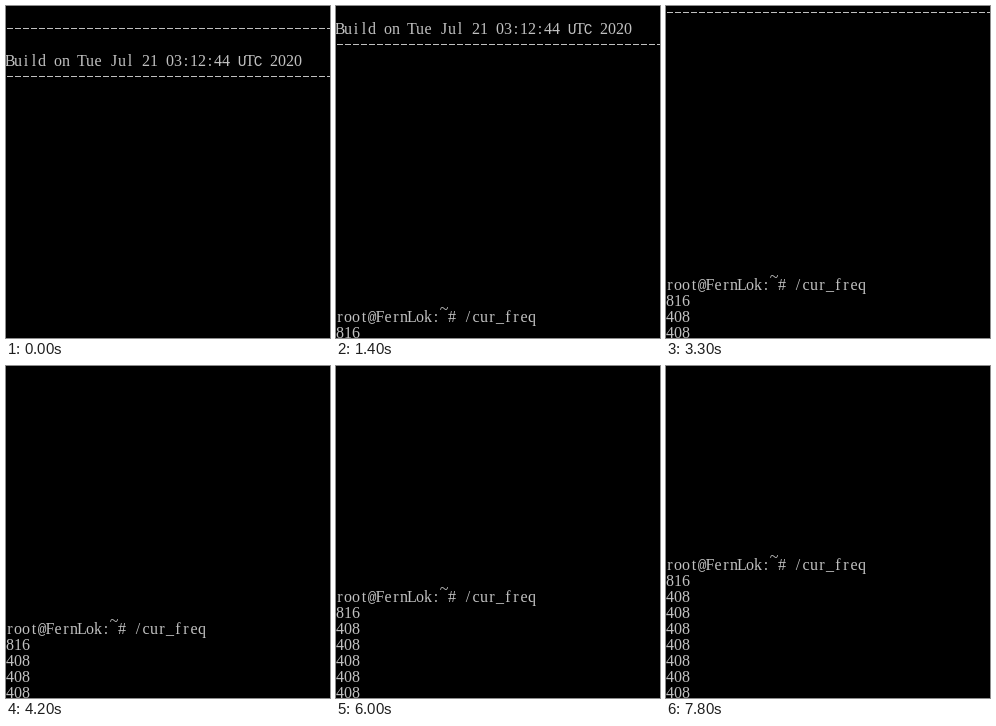
An HTML page that plays this animation: 324 by 332 pixels, repeating every 8 s.

```html
<!DOCTYPE html>
<html lang="en">
<head>
<meta charset="utf-8">
<title>Terminal</title>
<style>
  html, body { margin: 0; width: 100%; height: 100%; overflow: hidden; background: #000; }
  svg { display: block; width: 324px; height: 332px; background: #000; }
  text { font: 16px "Liberation Serif", serif; fill: #c0c0c0; text-anchor: middle; white-space: pre; }
  .wide { font: 14.5px "Liberation Mono", monospace; }
  .rule { stroke: #c0c0c0; stroke-width: 1; stroke-dasharray: 6 2; shape-rendering: crispEdges; }
</style>
</head>
<body>
<svg viewBox="0 0 324 332"><g id="screen"></g></svg>
<script>
const NS = 'http://www.w3.org/2000/svg';
const CELL = 8, ROW = 16, FIRST_BASELINE = 28;
const LOOP = 8000;
const scrollTimes = [500, 1400, 2400, 3300, 4200, 5100, 6000, 7000, 7800];
const screen = document.getElementById('screen');

function add(parent, name, attrs) {
  const node = document.createElementNS(NS, name);
  for (const key in attrs) node.setAttribute(key, attrs[key]);
  return parent.appendChild(node);
}

const baseline = row => FIRST_BASELINE + row * ROW;

// Each character is centred in its terminal cell.
function print(row, string) {
  const text = add(screen, 'text', {});
  [...string].forEach((char, i) => {
    const lift = char === '~' ? 8.5 : 0;
    const glyph = add(text, 'tspan', { x: (i + 0.5) * CELL, y: baseline(row) - lift });
    if (/[@UC]/.test(char)) glyph.setAttribute('class', 'wide');
    glyph.textContent = char;
  });
}

function rule(row) {
  const y = baseline(row) - 5.5;
  add(screen, 'line', { class: 'rule', x1: 1, x2: 324, y1: y, y2: y });
}

rule(0);
print(2, 'Build on Tue Jul 21 03:12:44 UTC 2020');
rule(3);
print(20, 'root@FernLok:~# /cur_freq');
print(21, '816');
for (let row = 22; row <= 28; row++) print(row, '408');

function render(time) {
  const lines = scrollTimes.filter(t => t <= time).length;
  screen.setAttribute('transform', `translate(0 ${-lines * ROW})`);
}

const start = performance.now();
function tick() {
  render((performance.now() - start) % LOOP);
  requestAnimationFrame(tick);
}
tick();
</script>
</body>
</html>
```
